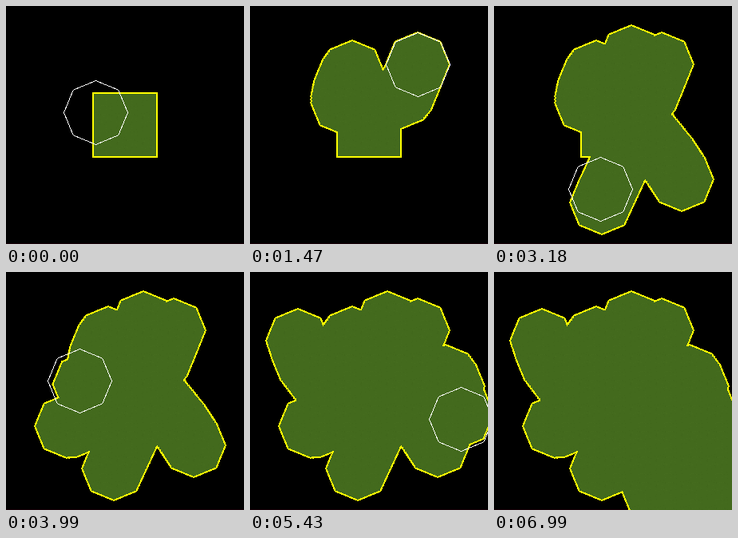
Write an HTML page that moves like this. It is 298 px wide and 298 px high and loops after 7.23 s.

```html
<!DOCTYPE html>
<html lang="en">
<head>
<meta charset="utf-8">
<title>Terrain brush</title>
<style>
  html, body { margin: 0; width: 100%; height: 100%; overflow: hidden; background: #000; }
  svg { display: block; width: 100vw; height: 100vh; }
  path { shape-rendering: crispEdges; }
</style>
</head>
<body>
<svg viewBox="0 0 298 298">
  <defs>
    <pattern id="grass" width="32" height="32" patternUnits="userSpaceOnUse">
      <rect width="32" height="32" fill="#436a1d"/>
    </pattern>
  </defs>
  <path stroke="#180008" d="M0 297.5H298"/>
  <path id="edge" fill="yellow"/>
  <path id="land" fill="url(#grass)"/>
  <path id="brush" fill="none" stroke="white"/>
</svg>
<script>
const LOOP = 7230, STEP = 30, LAG = 15, RADIUS = 40, SPACING = 4;
const MITER = 1 / Math.cos(Math.PI / 8);
const HOME = { x: 112, y: 133 }, EXIT = 6990;

// Each stroke: time to leave the last spot, start and end of painting, then x, y pairs
const strokes = [
  [0, 120, 600, 116, 121, 116, 113, 120, 94, 128, 83],
  [750, 1080, 1440, 189, 114, 198, 103, 210, 73],
  [1500, 1800, 2356, 172, 64, 163, 112, 194, 162, 220, 194, 235, 217],
  [2440, 2730, 3030, 170, 148, 161, 190, 135, 246],
  [3125, 3390, 3570, 124, 164, 88, 192, 76, 193],
  [3670, 3900, 4200, 114, 150, 86, 133, 67, 108, 60, 86],
  [4350, 4500, 4500, 104, 129],
  [4680, 4680, 5255, 104, 129, 151, 145, 245, 131, 254, 143],
  [5290, 5380, 6000, 264, 174, 264, 184, 285, 225, 270, 250, 231, 253],
  [6180, 6270, 6900, 200, 243, 199, 272, 250, 285, 336, 284]
];

const mix = (a, b, k) => a + (b - a) * k;
const gap = (a, b) => Math.hypot(b.x - a.x, b.y - a.y);

function octagon({ x, y }, r) {
  const points = Array.from({ length: 8 }, (_, i) => {
    const a = i * Math.PI / 4;
    return (x + r * Math.cos(a)).toFixed(2) + ' ' + (y + r * Math.sin(a)).toFixed(2);
  });
  return 'M' + points.join('L') + 'Z';
}

// grow is the distance the outline is pushed outwards
const block = grow => {
  const a = 109 - grow, b = 189 + grow;
  return `M${a} ${a}H${b}V${b}H${a}Z`;
};

// Turn strokes into timed keys at constant speed, and into stamps along the way
const keys = [{ t: 0, ...HOME }];
const stamps = [];

function stamp(p, time) {
  stamps.push({
    time,
    outer: octagon(p, RADIUS + MITER),
    inner: octagon(p, RADIUS - MITER)
  });
}

for (const [leave, begin, end, ...flat] of strokes) {
  const points = [];
  for (let i = 0; i < flat.length; i += 2) points.push({ x: flat[i], y: flat[i + 1] });
  const total = points.reduce((sum, p, i) => i ? sum + gap(points[i - 1], p) : 0, 0);

  keys.push({ ...keys[keys.length - 1], t: leave });
  let t = begin;
  points.forEach((p, i) => {
    if (i) {
      const last = points[i - 1], length = gap(last, p);
      const next = t + (end - begin) * length / total;
      const n = Math.ceil(length / SPACING);
      for (let j = 0; j <= n; j++) {
        const k = j / n;
        stamp({ x: mix(last.x, p.x, k), y: mix(last.y, p.y, k) }, mix(t, next, k));
      }
      t = next;
    }
    keys.push({ ...p, t });
  });
}

function position(t) {
  const i = keys.findIndex(key => key.t > t);
  if (i < 0) return keys[keys.length - 1];
  const a = keys[i - 1], b = keys[i];
  const k = (t - a.t) / (b.t - a.t);
  return { x: mix(a.x, b.x, k), y: mix(a.y, b.y, k) };
}

// Faint blades in the grass tile
const grass = document.getElementById('grass');
let seed = 7;
const random = () => (seed = seed * 16807 % 2147483647) / 2147483647;
for (let i = 0; i < 60; i++) {
  const blade = document.createElementNS('http://www.w3.org/2000/svg', 'rect');
  const look = {
    x: Math.floor(random() * 32), y: Math.floor(random() * 32),
    width: 1, height: 1,
    fill: i % 2 ? '#40661b' : '#466d1f'
  };
  for (const name in look) blade.setAttribute(name, look[name]);
  grass.append(blade);
}

const [edge, land, brush] = ['edge', 'land', 'brush'].map(id => document.getElementById(id));
let shown = -1;

function draw(now) {
  const t = Math.floor(now % LOOP / STEP) * STEP;
  if (t === shown) return;
  shown = t;
  const done = stamps.filter(s => s.time <= t - LAG);
  edge.setAttribute('d', block(1) + done.map(s => s.outer).join(''));
  land.setAttribute('d', block(-1) + done.map(s => s.inner).join(''));
  const { x, y } = position(t);
  const centre = { x: Math.round(x) + 0.5, y: Math.round(y) + 0.5 };
  brush.setAttribute('d', t < EXIT ? octagon(centre, RADIUS) : '');
}

const start = performance.now();
function tick() {
  draw(performance.now() - start);
  requestAnimationFrame(tick);
}
tick();
</script>
</body>
</html>
```
